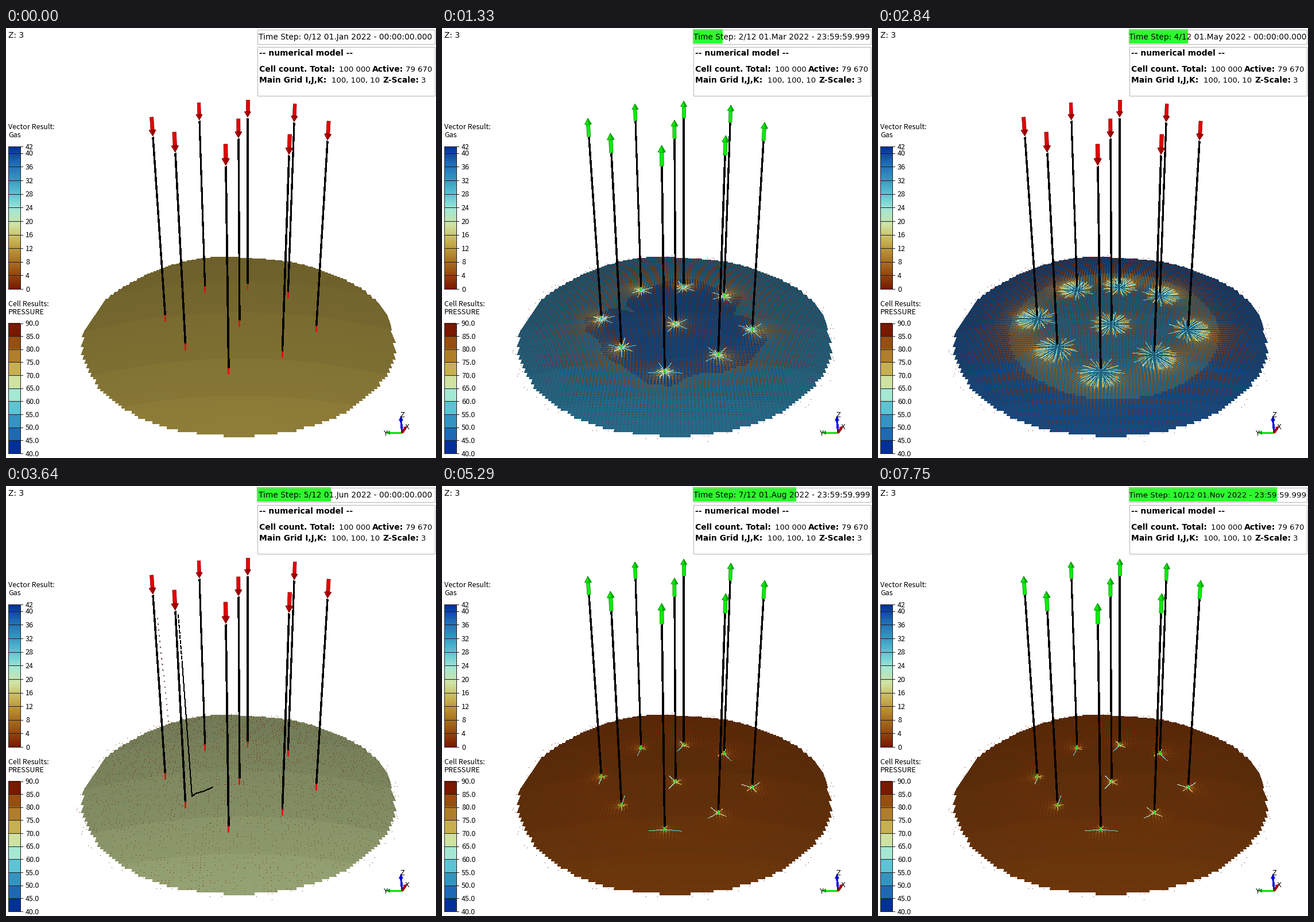
These frames come from a looping animation (749x748 px, 8 s). A matplotlib script:

```python
import numpy as np
import matplotlib.pyplot as plt
from matplotlib.animation import FuncAnimation
from matplotlib.collections import LineCollection, PolyCollection
from matplotlib.patches import Rectangle
from matplotlib.path import Path

W, H, DPI = 749, 748, 64
PT = 72 / DPI                      # points per pixel
LOOP, TICK = 8000, 40
X0, X1, Y0, Y1 = 120, 700, 380, 730   # area of the reservoir image

PALETTE = np.array([
    (122, 24, 0), (150, 78, 18), (176, 126, 40), (200, 176, 80),
    (208, 226, 160), (164, 232, 212), (92, 196, 212), (52, 148, 192),
    (32, 104, 180), (0, 48, 152)], float)

# well head x, y, well bottom x, y, arrow height
WELLS = np.array([
    (256, 190, 278, 510, 35), (295, 218, 313, 560, 37),
    (337, 162, 347, 460, 32), (383, 241, 388, 602, 39),
    (405, 193, 407, 519, 35), (421, 157, 421, 455, 32),
    (493, 222, 481, 573, 37), (502, 165, 491, 470, 33),
    (560, 197, 540, 529, 35)], float)

RIM = Path([
    (362, 398), (395, 398), (455, 402), (505, 408), (550, 421), (590, 437),
    (625, 457), (648, 477), (664, 499), (670, 515), (679, 562), (674, 582),
    (667, 600), (655, 615), (640, 632), (615, 653), (585, 672), (550, 688),
    (500, 701), (460, 707), (407, 712), (360, 708), (310, 703), (285, 697),
    (255, 688), (220, 671), (190, 651), (165, 630), (148, 605), (138, 585),
    (132, 562), (134, 540), (137, 526), (172, 474), (185, 463), (210, 447),
    (240, 431), (270, 418), (310, 406), (335, 401)])
CORE = Path([
    (250, 505), (275, 495), (300, 487), (345, 497), (320, 482), (325, 470),
    (350, 455), (400, 437), (440, 437), (485, 455), (523, 468), (508, 498),
    (540, 505), (568, 540), (530, 585), (490, 598), (440, 602), (400, 623),
    (355, 618), (318, 590), (280, 570), (275, 545), (250, 525)])
turn = np.linspace(0, 2 * np.pi, 60)
RING = Path(np.c_[411 + 183 * np.cos(turn), 536 + 110 * np.sin(turn)])

MIDNIGHT, DAY_END = "00:00:00.000", "23:59:59.999"
# start ms, month, clock, rim colour, zone, zone colour, flow (+ out, - in)
STEPS = [
    (0, "Jan", MIDNIGHT, 3, None, 0, 0),
    (500, "Feb", MIDNIGHT, 5, CORE, 6, -26),
    (1330, "Mar", DAY_END, 7, CORE, 8, -26),
    (2050, "Apr", MIDNIGHT, 8, CORE, 9, -26),
    (2840, "May", MIDNIGHT, 8, RING, 7, 38),
    (3640, "Jun", MIDNIGHT, 4, None, 0, 1),
    (4570, "Jul", DAY_END, 2, None, 0, 0),
    (5290, "Aug", DAY_END, 1, None, 0, -13),
    (6100, "Sep", DAY_END, 1, None, 0, -13),
    (6940, "Oct", DAY_END, 1, None, 0, -13),
    (7750, "Nov", DAY_END, 1, None, 0, -13)]
STARTS = [s[0] for s in STEPS]


def to_grid(x, y):
    j = (np.sqrt(1.54 ** 2 + 0.064 * (y - 398)) - 1.54) / 0.032
    return (x - 406) / (5.26 * (0.73 + 0.0055 * j)), j


def to_screen(i, j):
    return 406 + i * 5.26 * (0.73 + 0.0055 * j), 398 + 1.54 * j + 0.016 * j * j


def inside(path, x, y):
    return path.contains_points(np.c_[x.ravel(), y.ravel()]).reshape(x.shape)


def ramp(t):
    """Palette colour for t in 0..1, red to blue."""
    t = np.clip(t, 0, 1) * 9
    return np.stack([np.interp(t, range(10), PALETTE[:, c]) for c in range(3)], -1)


# pixel grid, cells, shading
px, py = np.meshgrid(np.arange(X0, X1) + 0.5, np.arange(Y0, Y1) + 0.5)
gi, gj = to_grid(px, py)
cx, cy = to_screen(np.floor(gi) + 0.5, np.floor(gj) + 0.5)
straight = (py > 474) & (py < 526)
MASK = np.where(straight, inside(RIM, px, py), inside(RIM, cx, cy))
arch = py - 0.00045 * (px - 410) ** 2
band = np.interp(np.digitize(arch, [440, 495, 575, 640]), range(5),
                 [0.55, 0.575, 0.615, 0.665, 0.71])
SHADE = 0.6 * band + 0.4 * np.interp(arch, [390, 710], [0.54, 0.73])

ci, cj = [a.ravel() + 0.5 for a in np.meshgrid(np.arange(-53, 53), np.arange(-2, 103))]
sx, sy = to_screen(ci, cj)
LIVE = inside(RIM, sx, sy)
STRAY = ~LIVE & (np.hypot(ci, cj - 50) < 52.5)
wi, wj = to_grid(WELLS[:, 2], WELLS[:, 3] - 4)


def flow_field(q):
    """Nine line sources in a closed disc; returns direction and strength."""
    di, dj = ci[:, None] - wi, cj[:, None] - wj
    r2 = di ** 2 + dj ** 2 + 0.05
    vi = (di / r2).sum(1) - 9 * ci / 2500
    vj = (dj / r2).sum(1) - 9 * (cj - 50) / 2500
    size = np.hypot(vi, vj) + 1e-9
    power = np.minimum((abs(q) * size) ** 1.4 / 2.7, 27)
    return np.sign(q) * vi / size, np.sign(q) * vj / size, power


def draw_vectors(img, q):
    rng = np.random.default_rng(4)
    ui, uj, power = flow_field(q)
    luck = rng.random(ci.size)
    keep = (LIVE & (luck < (0.3 if abs(q) < 2 else 1))) | (STRAY & (luck < 0.13))
    length = np.where(LIVE, 0.2 * power, 0)
    order = np.argsort(power)
    order = order[keep[order]]
    t = np.linspace(0, 1, 40)
    i = ci[order, None] + (ui * length)[order, None] * t
    j = np.maximum(cj[order, None] + (uj * length)[order, None] * t, -4)
    x, y = to_screen(i, j)
    x = np.clip(x - X0, 0, X1 - X0 - 1).astype(int)
    y = np.clip(y - Y0, 0, Y1 - Y0 - 1).astype(int)
    color = np.repeat(ramp(power[order] / 42)[:, None, :], t.size, 1)
    img[y, x, :3] = color
    img[y, x, 3] = 255


def reservoir(step):
    _, _, _, rim, zone, core, q = step
    base = np.broadcast_to(PALETTE[rim], px.shape + (3,)).copy()
    if zone is not None:
        base[inside(zone, cx, cy)] = PALETTE[core]
    img = np.dstack([base * SHADE[..., None], MASK * 255]).astype(np.uint8)
    if q:
        draw_vectors(img, q)
    return img


IMAGES = [reservoir(s) for s in STEPS]

fig = plt.figure(figsize=(W / DPI, H / DPI), dpi=DPI, facecolor="white")
ax = fig.add_axes([0, 0, 1, 1])
ax.axis("off")


def label(x, y, s, px_size, font="DejaVu Sans", **kw):
    return ax.text(x, y, s, fontsize=px_size * PT, family=font, **kw)


def lines(segs, color, width, **kw):
    kw.setdefault("antialiased", False)
    widths = np.atleast_1d(width) * PT
    return ax.add_collection(LineCollection(segs, colors=color, linewidths=widths,
                                            capstyle="butt", **kw))


def frame_box(x, y, w, h):
    ax.add_patch(Rectangle((x, y), w, h, fc="none", ec="#b4b4b4", lw=PT, zorder=5))


def picture(img, x0, x1, y0, y1):
    return ax.imshow(img, extent=(x0, x1, y1, y0), aspect="auto",
                     interpolation="nearest", origin="upper")


disc = picture(IMAGES[0], X0, X1, Y0, Y1)

# legends
LEGEND = "Noto Sans CJK JP"
for y, s in [(176, "Vector Result:"), (190, "Gas"),
             (484, "Cell Results:"), (498, "PRESSURE")]:
    label(4, y, s, 12.6, LEGEND)
picture(ramp(np.linspace(1, 0, 248))[:, None].astype(np.uint8), 4, 25, 206, 454)
picture(PALETTE[:, None].astype(np.uint8), 4, 25, 513.5, 740)
marks = [(454 - v * 248 / 42, str(v)) for v in [42, *range(40, -1, -4)]]
marks += [(513.5 + k * 22.65, f"{90 - 5 * k:.1f}") for k in range(11)]
for y, s in marks:
    label(34, y + 4.6, s, 12.6, LEGEND)
lines([[(4, y), (29, y)] for y, _ in marks], "#202020", 1)
lines([[(x, a), (x, b)] for x in (4, 25) for a, b in ((206, 454), (513.5, 740))],
      "#202020", 0.8)

# header
label(4, 17, "Z: 3", 13.7)
bar = ax.add_patch(Rectangle((437, 2), 0, 25, fc="#2dfb2d", lw=0))
frame_box(437.5, 2.5, 309, 25)
frame_box(437.5, 32.5, 309, 85)
clock = label(591.5, 20, "", 13.7, ha="center")
for x, y, s, bold in [
        (441, 48, "-- numerical model --", 1),
        (441, 76, "Cell count. Total:", 1), (580, 76, "100 000", 0),
        (638, 76, "Active:", 1), (696, 76, "79 670", 0),
        (441, 95, "Main Grid I,J,K:", 1), (567, 95, "100, 100, 10", 0),
        (656, 95, "Z-Scale:", 1), (723, 95, "3", 0)]:
    label(x, y, s, 13.9 if bold else 13.2, weight="bold" if bold else "normal")

# wells
heads, feet, rise = WELLS[:, :2], WELLS[:, 2:4], WELLS[:, 4]
axis = heads - feet
axis /= np.linalg.norm(axis, axis=1)[:, None]
lines(np.stack([heads, feet + 10 * axis], 1), "black", 0.07 * rise, zorder=2)
red_tips = lines(np.stack([feet + 10 * axis, feet], 1), "#dc1414", 2, zorder=2)
green_tips = lines(np.stack([feet + 8 * axis, feet + 3 * axis], 1), "#30d820", 2, zorder=2)


def arrows(points, colors, edge):
    """points: per part, a list of (along, across) given by height and scale."""
    polys, fills = [], []
    for top, u, h in zip(heads, axis, rise):
        side = np.array([-u[1], u[0]])
        for shape, color in zip(points(h, h / 37), colors):
            polys.append([top + a * u + b * side for a, b in shape])
            fills.append(color)
    return ax.add_collection(PolyCollection(
        polys, facecolors=fills, edgecolors=edge, linewidths=0.7 * PT, zorder=3))


def down(h, s):
    return [[(13 * s, -3.2 * s), (h, -3.2 * s), (h, 3.2 * s), (13 * s, 3.2 * s)],
            [(2, 0), (13 * s, -6.3 * s), (14.5 * s, 0), (13 * s, 6.3 * s)],
            [(2, 0), (13 * s, -6.3 * s), (14 * s, -2 * s)]]


def up(h, s):
    b = h - 13 * s
    return [[(1, -3.2 * s), (b, -3.2 * s), (b, 3.2 * s), (1, 3.2 * s)],
            [(h - 2, 0), (b, -6.3 * s), (b - 1, 0), (b, 6.3 * s)],
            [(h - 2, 0), (b, 6.3 * s), (b - 1, 2.5 * s)]]


red_arrows = arrows(down, ["#e60000", "#a00000", "#cc0808"], "#780000")
green_arrows = arrows(up, ["#08ee08", "#08e408", "#06b406"], "#068a06")

# loose traces seen while the wells are shut
traces = [
    lines([[(300, 224), (307, 310)]], "black", 1, linestyles=[(0, (5, 3))]),
    lines([[(307, 310), (324, 540)], [(324, 540), (330, 535)],
           [(330, 535), (344, 531)], [(344, 531), (360, 524)]], "black", 1),
    lines([[(264, 230), (283, 410)]], "#806060", 1, linestyles=[(0, (1, 8))])]

# axis triad
lines([[(690, 704), (688, 682)]], "#0a0af0", 2.6, zorder=4)
lines([[(690, 704), (668, 704)]], "#00e400", 2.6, zorder=4)
lines([[(690, 704), (694, 698)]], "#a00000", 3, zorder=4)
for tri, color in [([(688, 674), (684, 683), (692, 683)], "#0a0ac8"),
                   ([(661, 704), (669, 700.5), (669, 707.5)], "#00a000"),
                   ([(698, 692), (691, 695), (696, 700)], "#c00808")]:
    ax.fill(*zip(*tri), color=color, lw=0, zorder=4)
for x, y, s in [(690, 677, "Z"), (661, 709, "Y"), (699, 698, "X")]:
    label(x, y, s, 11.5, ha="center", zorder=5)

ax.set_xlim(0, W)
ax.set_ylim(H, 0)


def update(frame):
    now = frame * TICK + TICK - 10
    n = np.searchsorted(STARTS, now, side="right") - 1
    _, month, hour, _, _, _, q = STEPS[n]
    disc.set_data(IMAGES[n])
    bar.set_width(309 * n / 12)
    clock.set_text(f"Time Step: {n}/12 01.{month} 2022 - {hour}")
    clock.set_fontsize((13.7 if n < 10 else 13.35) * PT)
    producing = q < 0
    green_arrows.set_visible(producing)
    green_tips.set_visible(producing)
    red_arrows.set_visible(not producing)
    red_tips.set_visible(0 <= q < 2)
    for trace in traces:
        trace.set_visible(q == 1)
    return []


anim = FuncAnimation(fig, update, frames=LOOP // TICK, interval=TICK,
                     repeat=True, repeat_delay=0, blit=False)
plt.show()
```
